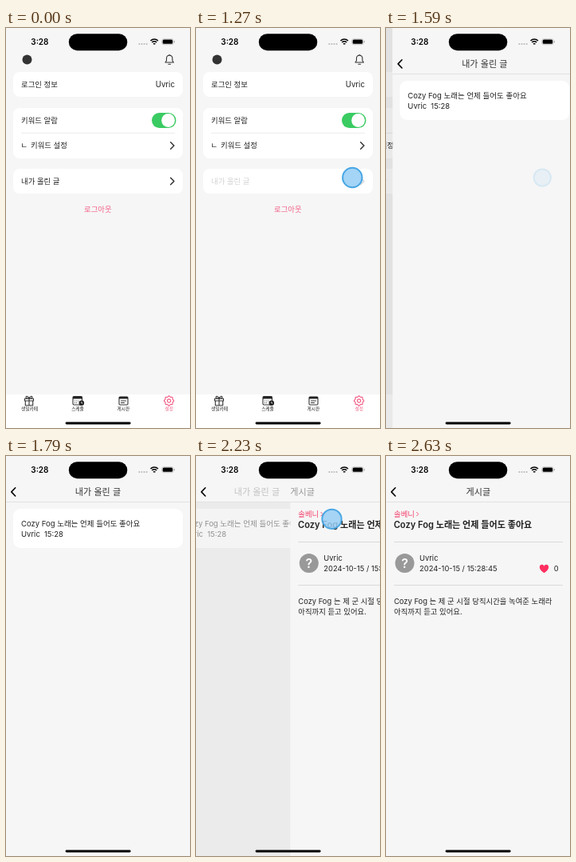
An HTML page for the animation above (2.8 s loop, 231 by 500 pixels).

```html
<!DOCTYPE html>
<html lang="ko">
<head>
<meta charset="utf-8">
<style>
html, body { margin: 0; height: 100%; overflow: hidden; background: #f6f6f6; }
svg { display: block; width: 100vw; height: 100vh; }
text { font: 9.4px Inter, "Noto Sans CJK KR", "Noto Sans CJK", sans-serif; fill: #222; white-space: pre; }
.pink { fill: #f2638a; }
.tab { font-size: 5.7px; text-anchor: middle; }
.title { font-size: 11.1px; text-anchor: middle; fill: #333; }
.line { fill: none; stroke: #333; stroke-width: 1.1; stroke-linecap: round; stroke-linejoin: round; }
.arrow { stroke-width: 1.5; }
.card { fill: #fff; }
#list text { font-size: 9.5px; }
</style>
</head>
<body>
<svg viewBox="0 0 231 500">
  <g id="home">
    <rect width="231" height="500" fill="#f6f6f6"/>
    <circle cx="26.5" cy="39.5" r="6" fill="#333"/>
    <path class="line" d="M200 43h10.4l-1.5-2.2v-3a3.7 3.7 0 0 0-7.4 0v3zM205.2 34v-.8M203.8 45.2h2.8"/>
    <rect class="card" x="9" y="55" width="213" height="31" rx="8"/>
    <text x="19" y="74.3">로그인 정보</text>
    <text x="212" y="74.2" text-anchor="end" style="font-size:9.7px">Uvric</text>
    <rect class="card" x="9" y="100" width="213" height="63" rx="8"/>
    <text x="19" y="118.6">키워드 알람</text>
    <rect x="183" y="106" width="30.5" height="19" rx="9.5" fill="#3acb62"/>
    <circle cx="203.6" cy="115.5" r="8.4" fill="#fff"/>
    <path d="M19 131.3H212" stroke="#ececec"/>
    <text x="18.5" y="150.3">ㄴ</text>
    <text x="31" y="150.3">키워드 설정</text>
    <path class="line arrow" d="M206.7 142.8l4.2 4.2-4.2 4.2"/>
    <rect class="card" x="9" y="176" width="213" height="31" rx="8"/>
    <g id="row">
      <text x="19" y="194.9">내가 올린 글</text>
      <path class="line arrow" d="M206.7 187.3l4.2 4.2-4.2 4.2"/>
    </g>
    <text class="pink" x="115.3" y="229.5" text-anchor="middle">로그아웃</text>
    <rect class="card" y="458" width="231" height="42"/>
    <path class="line" d="M23.5 463.2h11v2.8h-11zM24.3 466v5.7h9.4V466M29 463.2v8.5M29 463c-1-3-4.2-3.4-4-1.2 0 1 1.5 1.2 4 1.2 1-3 4.2-3.4 4-1.2 0 1-1.5 1.2-4 1.2"/>
    <rect class="line" x="84" y="460.5" width="11.5" height="10.5" rx="1.2"/>
    <path d="M84 461h11.5v2.5H84z" fill="#222"/>
    <path class="line" d="M86.5 466h6M86.5 468.5h4" stroke-dasharray="0 2"/>
    <circle cx="94.8" cy="468.8" r="3.3" fill="#222"/>
    <path d="M94.8 467v2h1.5" fill="none" stroke="#fff" stroke-width=".7"/>
    <rect class="line" x="142" y="461" width="11" height="10" rx="1.2"/>
    <path d="M142 461h11v2.5h-11z" fill="#222"/>
    <path class="line" d="M144.5 466h6M144.5 468.5h4"/>
    <g fill="none" stroke="#f2638a" stroke-width="1.2" transform="translate(204.6 466)">
      <path id="gear"/><circle r="2.1"/>
    </g>
    <text class="tab" x="29.5" y="478">생일카페</text>
    <text class="tab" x="90" y="478">스케줄</text>
    <text class="tab" x="147.3" y="477.7">게시판</text>
    <text class="tab pink" x="204.7" y="478">설정</text>
  </g>
  <rect id="homeDim" width="231" height="500"/>

  <g id="list">
    <rect width="231" height="500" fill="#f6f6f6"/>
    <rect class="card" x="9" y="66" width="213" height="49" rx="9"/>
    <g id="item">
      <text x="19" y="87.7">Cozy Fog 노래는 언제 들어도 좋아요</text>
      <text x="19" y="100.5">Uvric</text>
      <text x="48" y="100.5">15:28</text>
    </g>
  </g>
  <rect id="listDim" y="57" width="231" height="443"/>

  <g id="post">
    <rect y="57" width="231" height="443" fill="#f6f6f6"/>
    <text x="10" y="76" style="fill:#f43f6b">솔베니</text>
    <path class="line" d="M38.5 70.3l2.3 2.3-2.3 2.3" style="stroke:#f43f6b;stroke-width:.9"/>
    <text x="9.7" y="90.4" style="font-size:11.1px;font-weight:600">Cozy Fog 노래는 언제 들어도 좋아요</text>
    <path d="M10 107.5H222M10 161.5H222" stroke="#dadada"/>
    <circle cx="23.5" cy="134" r="12" fill="#999"/>
    <text x="23.5" y="139.6" text-anchor="middle" style="font-size:16px;font-weight:600;fill:#fff">?</text>
    <text x="42" y="131">Uvric</text>
    <text x="42" y="144.3">2024-10-15 / 15:28:45</text>
    <path d="M198.5 146.3c-3.5-2.5-5.7-4.6-5.7-7.2 0-3.8 4.4-4.3 5.7-1.4 1.3-2.9 5.7-2.4 5.7 1.4 0 2.6-2.2 4.7-5.7 7.2z" fill="#ff2f60"/>
    <text x="210.7" y="144.3">0</text>
    <text x="10" y="185">Cozy Fog 는 제 군 시절 당직시간을 녹여준 노래라</text>
    <text x="10" y="198">아직까지 듣고 있어요.</text>
  </g>

  <g id="nav">
    <rect width="231" height="57" fill="#f6f6f6"/>
    <path d="M0 57.5H231" stroke="#e2e2e2"/>
    <path class="line" d="M11.7 39.8L6.8 44.9l4.9 5.1" style="stroke:#000;stroke-width:1.6"/>
    <text id="listTitle" class="title" x="115.5" y="48.8">내가 올린 글</text>
    <text id="postTitle" class="title" x="115.8" y="48.8">게시글</text>
  </g>

  <text x="31.3" y="20.9" style="font-size:10px;font-weight:600;fill:#000">3:28</text>
  <rect x="78.8" y="7.2" width="73.5" height="21" rx="10.5"/>
  <path d="M166.5 20h11" stroke="#aaa" stroke-width="1.5" stroke-dasharray="1.7 1.4"/>
  <g fill="none" stroke="#000" stroke-width="1.6">
    <path d="M181.5 16a6.5 6.5 0 0 1 9.4 0M183.3 18a4 4 0 0 1 5.8 0"/>
    <path d="M185.5 19.8h1.4" stroke-linecap="round"/>
  </g>
  <rect x="195.7" y="13.7" width="14.5" height="7" rx="2.3" fill="none" stroke="#aaa" stroke-width=".6"/>
  <rect x="196.7" y="14.6" width="12.5" height="5.2" rx="1.5"/>
  <path d="M211.3 16v2.3" stroke="#aaa"/>
  <rect x="74.6" y="492.6" width="82" height="2.9" rx="1.45"/>
  <circle id="touch" fill="#97cef5" fill-opacity=".88" stroke="#46a5e3" stroke-width="2"/>
</svg>
<script>
const W = 231, LOOP = 2800;
const STEPS = [0, 100, 1270, 1350, 1490, 1590, 1690, 1790, 1900,
  2020, 2120, 2220, 2330, 2430, 2530, 2630];
const el = id => document.getElementById(id);
const clamp = v => Math.min(1, Math.max(0, v));
const move = (id, x, y = 0) => el(id).setAttribute("transform", `translate(${x} ${y})`);
const fade = (id, a) => el(id).setAttribute("opacity", a);

// Distance a pushed page still has to travel: a critically damped spring
function remaining(t, start) {
  const k = Math.max(0, t - start) / 50;
  const x = W * (1 + k) * Math.exp(-k);
  return x < .3 ? 0 : x;
}

const pressed = (t, down, up) => t < down ? 1 : .2 + .8 * clamp((t - up) / 250);

function draw(now) {
  const t = STEPS.findLast(s => s <= now);
  const a = remaining(t, 1333), b = remaining(t, 2138);
  const p = 1 - a / W, q = 1 - b / W;

  move("home", -.3 * W * p);
  fade("homeDim", .09 * p);
  move("list", a - .3 * W * q);
  fade("listDim", .09 * q);
  move("post", b);
  move("nav", a);
  move("listTitle", -80 * q);
  fade("listTitle", clamp(1 - 1.5 * q));
  move("postTitle", .15 * b);
  fade("postTitle", q);
  fade("row", pressed(t, 1270, 1333));
  fade("item", pressed(t, 2120, 2138));

  // The touch mark shrinks a little while it fades
  const first = t < 2020;
  const shown = t < 100 ? 0 : clamp(1 - (t - (first ? 1340 : 2210)) / 300);
  if (first) move("touch", 196.3, t < 1270 ? 185.7 : 187);
  else move("touch", 170.5, 78.8);
  el("touch").setAttribute("r", 10.3 + 1.9 * shown);
  fade("touch", shown);
}

const teeth = Array.from({ length: 64 }, (_, i) => {
  const ang = i * Math.PI / 32, r = 5.5 + .6 * Math.cos(8 * ang);
  return [r * Math.cos(ang), r * Math.sin(ang)];
});
el("gear").setAttribute("d", "M" + teeth.join("L") + "z");

const start = performance.now();
function tick() {
  draw((performance.now() - start) % LOOP);
  requestAnimationFrame(tick);
}
tick();
</script>
</body>
</html>
```
